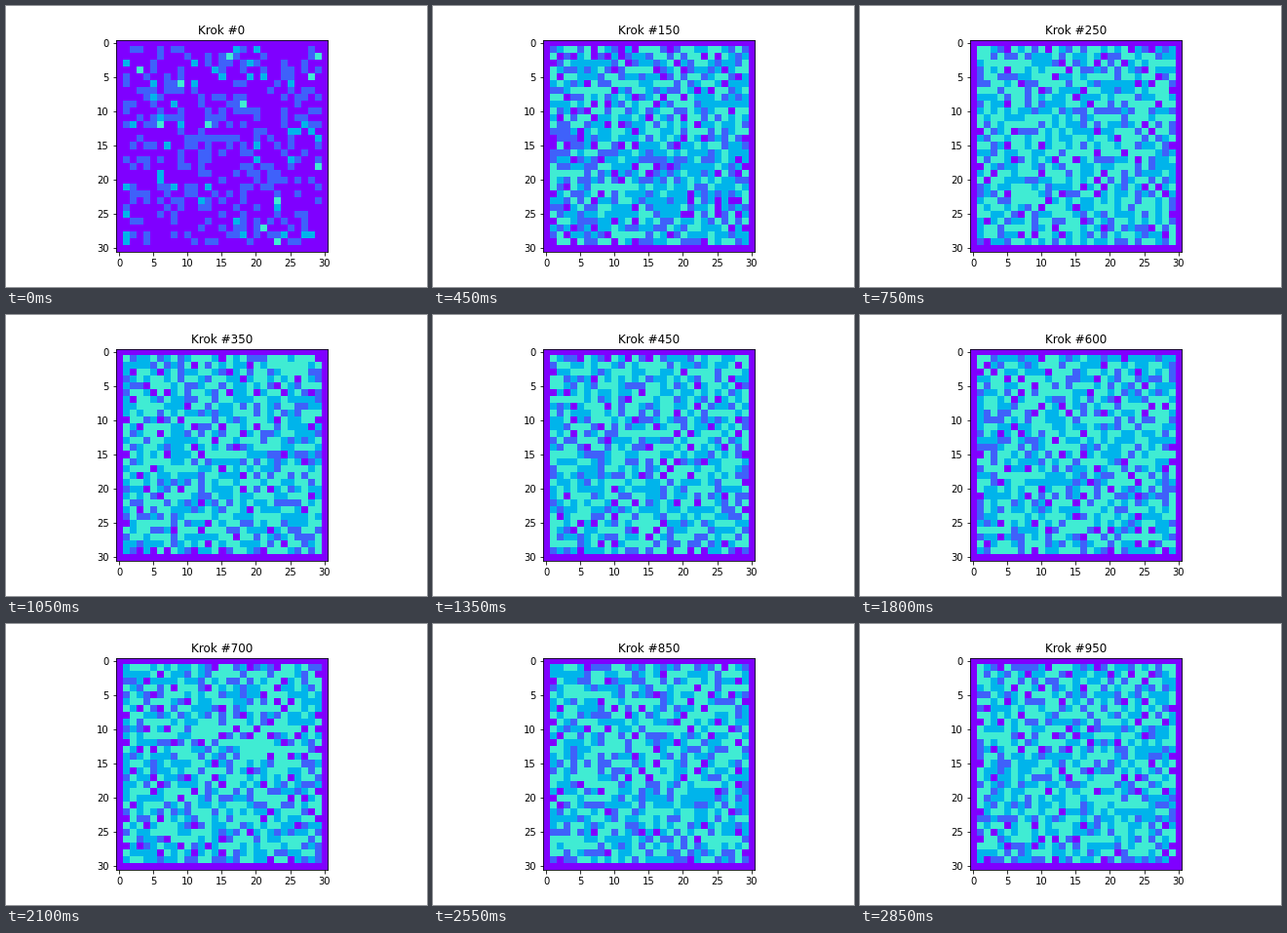
Write a matplotlib script that moves like this. It is 432x288 px and loops after 3000 ms.

```python
import matplotlib.pyplot as plt
import numpy as np
from matplotlib.animation import FuncAnimation

SIZE = 31
FRAMES = 20
STEPS_PER_FRAME = 50
GRAINS_PER_STEP = 8
# Tallest starting piles as (row, column)
PEAKS = [(2, 16), (2, 29), (4, 3), (5, 28), (6, 9), (9, 18),
         (12, 6), (12, 13), (18, 29), (23, 23), (27, 21), (29, 23)]


def initial_pile(rng):
    pile = np.zeros((SIZE, SIZE), dtype=int)
    inner = SIZE - 2
    pile[1:-1, 1:-1] = rng.choice(3, size=(inner, inner), p=[0.65, 0.29, 0.06])
    for row, col in PEAKS:
        pile[row, col] = 3
    return pile


def clear_border(pile):
    pile[[0, -1], :] = 0
    pile[:, [0, -1]] = 0


def add_grains(pile, count, rng):
    rows, cols = rng.integers(1, SIZE - 1, size=(2, count))
    np.add.at(pile, (rows, cols), 1)


def relax(pile):
    """Topple piles of four or more; grains fall off at the border."""
    while (pile > 3).any():
        spill = pile // 4
        pile -= 4 * spill
        pile[1:] += spill[:-1]
        pile[:-1] += spill[1:]
        pile[:, 1:] += spill[:, :-1]
        pile[:, :-1] += spill[:, 1:]
        clear_border(pile)


def simulate():
    rng = np.random.default_rng(7)
    pile = initial_pile(rng)
    states = [pile.copy()]
    for _ in range(FRAMES - 1):
        add_grains(pile, STEPS_PER_FRAME * GRAINS_PER_STEP, rng)
        relax(pile)
        states.append(pile.copy())
    return states


states = simulate()

plt.rcParams.update({"font.family": "DejaVu Sans", "font.size": 10})
fig = plt.figure(figsize=(6, 4), dpi=72, facecolor="white")
fig.subplots_adjust(left=0.125, right=0.9, bottom=0.125, top=0.88)
ax = fig.add_subplot()
image = ax.imshow(states[0], cmap="rainbow", vmin=0, vmax=8,
                  interpolation="nearest")
ax.set_xticks(range(0, SIZE, 5))
ax.set_yticks(range(0, SIZE, 5))
title = ax.set_title("Krok #0", fontsize=12)


def update(frame):
    image.set_data(states[frame])
    title.set_text(f"Krok #{frame * STEPS_PER_FRAME}")
    return image, title


anim = FuncAnimation(fig, update, frames=FRAMES, interval=150,
                     repeat=True, repeat_delay=0, blit=False)
plt.show()
```
